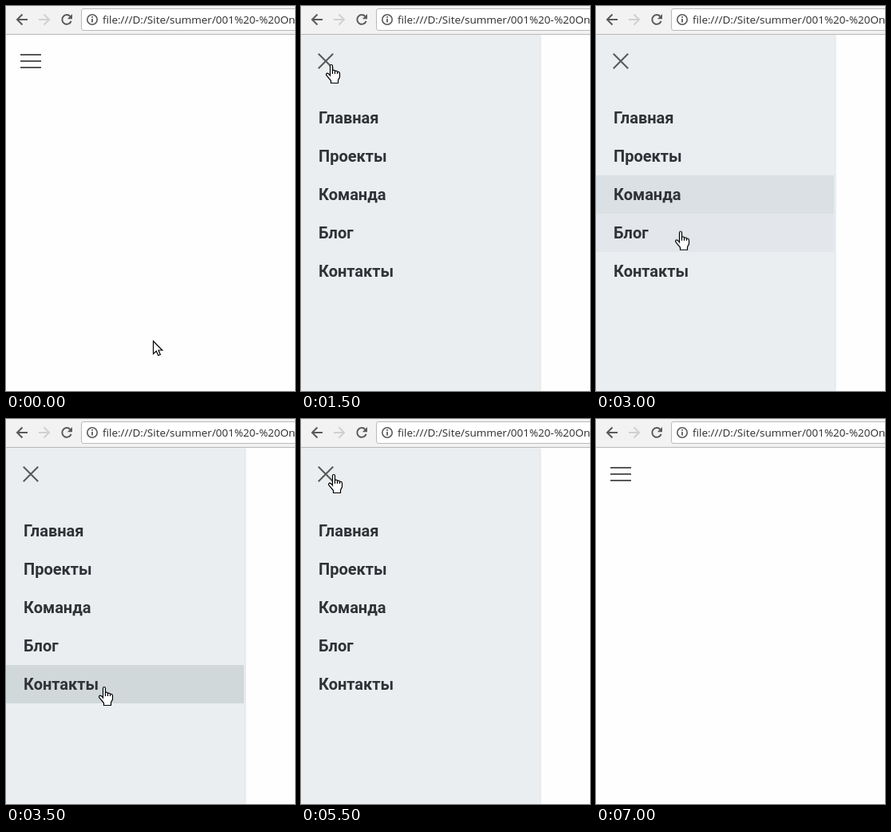
An HTML page for the animation above (7.25 s loop, 362 by 482 pixels).

```html
<!DOCTYPE html>
<html lang="ru">
<head>
<meta charset="utf-8">
<title>Menu</title>
<style>
  html, body { margin: 0; width: 100%; height: 100%; overflow: hidden; background: #fff; }
  .stage { position: relative; width: 362px; height: 482px; overflow: hidden; background: #fefefe; }
  .stage > *, .cursor svg { position: absolute; }

  .bar {
    left: 0; top: 0; width: 362px; height: 35px;
    background: #f2f2f2; border-bottom: 1px solid #b8b8b8;
  }
  .field {
    position: absolute; left: 94px; top: 3px; width: 300px; height: 26px;
    box-sizing: content-box; border: 1px solid #bababa; border-radius: 3px; background: #fff;
  }
  .url {
    position: absolute; left: 121px; top: 7px; line-height: 20px; white-space: nowrap;
    font: 13.5px/20px "Open Sans", "Noto Sans", sans-serif; color: #2b2b2b;
  }
  .bar svg { position: absolute; left: 0; top: 0; }

  /* 29 ticks of 250 ms; one tick = 3.448% */
  .menu, .open, .closed, .row, .cursor, .hand, .arrow { animation: 7250ms step-end infinite; }

  .menu {
    left: 0; top: 36px; width: 299px; height: 446px; margin: 0; padding: 80px 0 0;
    box-sizing: border-box; list-style: none; background: #eaeef1;
    box-shadow: 0 0 3px rgba(0, 0, 0, .25);
    animation-name: shown;
  }
  .row {
    width: 298px; height: 48px; padding-left: 22px; box-sizing: border-box;
    font: 700 20px/48px Roboto, "Noto Sans", sans-serif; color: #303236;
  }
  .row:nth-child(1) { animation-name: row1; }
  .row:nth-child(2) { animation-name: row2; }
  .row:nth-child(3) { animation-name: row3; }
  .row:nth-child(4) { animation-name: row4; }
  .row:nth-child(5) { animation-name: row5; }

  .icon { left: 18px; top: 56px; stroke: #585858; stroke-width: 2; }
  .open { animation-name: shown; }
  .closed { animation-name: hidden; }

  .cursor { left: 0; top: 0; animation-name: move; }
  .cursor svg { overflow: visible; fill: #fff; stroke: #000; stroke-width: 1.2; }
  .hand { left: -6px; animation-name: hand; }
  .arrow { animation-name: arrow; }

  @keyframes shown { 0%, 82.758% { opacity: 0 } 20.689% { opacity: 1 } }
  @keyframes hidden { 0%, 82.758%, 100% { opacity: 1 } 20.689% { opacity: 0 } }
  @keyframes hand { 0%, 86.206%, 100% { opacity: 0 } 10.344% { opacity: 1 } }
  @keyframes arrow { 0%, 86.206% { opacity: 1 } 10.344%, 96.551%, 100% { opacity: 0 } }

  @keyframes move {
    0% { transform: translate(184px, 419px) }
    3.448% { transform: translate(195px, 412px) }
    6.896% { transform: translate(120px, 230px) }
    10.344% { transform: translate(33px, 70px) }
    13.793% { transform: translate(37px, 73px) }
    27.586% { transform: translate(42px, 82px) }
    31.034% { transform: translate(54px, 122px) }
    34.482% { transform: translate(54px, 122px); animation-timing-function: steps(4, start) }
    48.275% { transform: translate(122px, 335px) }
    51.724% { transform: translate(122px, 335px); animation-timing-function: steps(4, start) }
    65.517% { transform: translate(122px, 305px); animation-timing-function: steps(3, start) }
    75.862% { transform: translate(44px, 78px) }
    75.863% { transform: translate(40px, 69px) }
    86.206% { transform: translate(40px, 69px); animation-timing-function: steps(3, start) }
    96.551%, 100% { transform: translate(160px, 470px) }
  }

  @keyframes row1 {
    0%, 37.931%, 75.862%, 100% { background: rgb(208 216 218 / 0) }
    31.034%, 72.413% { background: rgb(208 216 218 / .15) }
    34.482%, 68.965% { background: rgb(208 216 218 / .6) }
  }
  @keyframes row2 {
    0%, 41.379%, 100% { background: rgb(208 216 218 / 0) }
    34.482% { background: rgb(208 216 218 / .3) }
    37.931% { background: rgb(208 216 218 / .6) }
  }
  @keyframes row3 {
    0%, 44.827%, 72.413%, 100% { background: rgb(208 216 218 / 0) }
    37.931%, 68.965% { background: rgb(208 216 218 / .3) }
    41.379%, 65.517% { background: rgb(208 216 218 / .6) }
  }
  @keyframes row4 {
    0%, 48.275%, 68.965%, 100% { background: rgb(208 216 218 / 0) }
    41.379% { background: rgb(208 216 218 / .3) }
    44.827%, 65.517% { background: rgb(208 216 218 / .6) }
  }
  @keyframes row5 {
    0%, 68.965%, 100% { background: rgb(208 216 218 / 0) }
    44.827% { background: rgb(208 216 218 / .5) }
    48.275% { background: rgb(208 216 218 / 1) }
    65.517% { background: rgb(208 216 218 / .3) }
  }
</style>
</head>
<body>
<div class="stage">
  <ul class="menu">
    <li class="row">Главная</li>
    <li class="row">Проекты</li>
    <li class="row">Команда</li>
    <li class="row">Блог</li>
    <li class="row">Контакты</li>
  </ul>

  <svg class="icon closed" width="26" height="26"><path d="M0 5H26M0 13H26M0 21H26"/></svg>
  <svg class="icon open" width="26" height="26"><path d="M3.8 3.8L22.2 22.2M22.2 3.8L3.8 22.2"/></svg>

  <div class="bar">
    <div class="field"></div>
    <svg width="120" height="35" fill="none" stroke="#5a5a5a" stroke-width="2">
      <path d="M27 17H14M20.5 10.5L14 17L20.5 23.5"/>
      <path d="M41 17H54M47.5 10.5L54 17L47.5 23.5" stroke="#d0d0d0"/>
      <path d="M80.4 13A5.8 5.8 0 1 0 81.6 18.8"/>
      <path d="M83 10V16.2H76.8Z" fill="#5a5a5a" stroke="none"/>
      <circle cx="108" cy="17" r="6.2" stroke-width="1.6"/>
      <path d="M108 16V20.5M108 13V14.8" stroke-width="1.8"/>
    </svg>
    <div class="url">file:///D:/Site/summer/001%20-%20On</div>
  </div>

  <div class="cursor">
    <svg class="arrow" width="13" height="20"><path d="M.5 .5V16.5L4.3 13L6.8 18.5L9.3 17.5L7 12H11.8Z"/></svg>
    <svg class="hand" width="19" height="25">
      <path d="M5.5 14V2Q5.5 .5 7 .5T8.5 2V7.5Q11 6.5 11.5 8.5Q14 7.5 14.5 9.5Q17.5 9 17.5 11.5V16L15.5 20V23.5H6.5V20.5L1 14Q-.2 12 1.5 11.2Q3.5 11 5.5 14Z"/>
      <path d="M8.5 7.5V12M11.5 8.5V12M14.5 9.5V12"/>
    </svg>
  </div>
</div>
</body>
</html>
```
